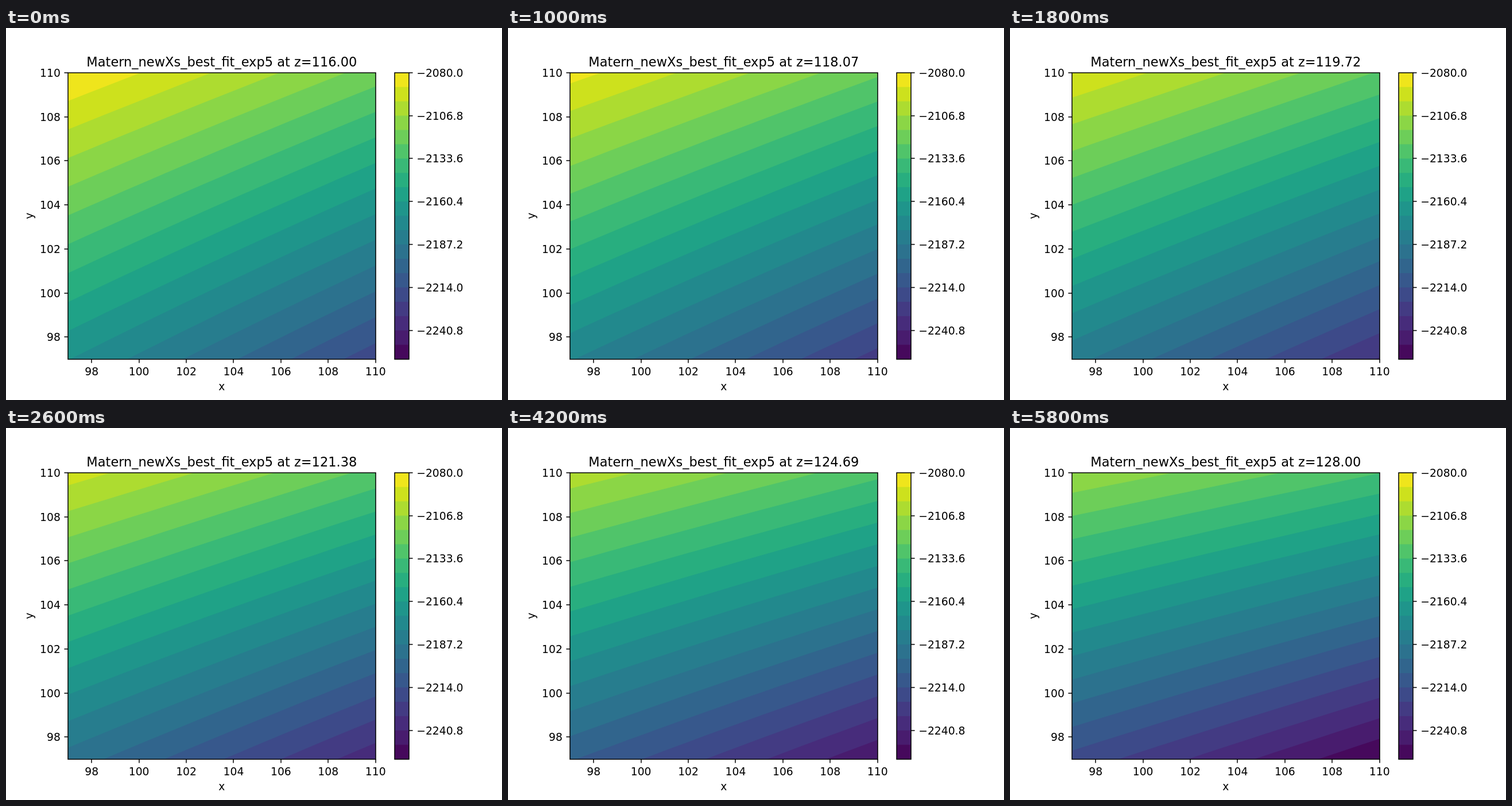
An HTML page that plays this animation: 864x648 px, repeating every 6000 ms.

```html
<!DOCTYPE html>
<html lang="en">
<head>
<meta charset="utf-8">
<title>Contour sweep</title>
<style>
  html, body { margin: 0; width: 100%; height: 100%; overflow: hidden; background: #fff; }
  svg { display: block; }
  text { font-family: "DejaVu Sans", sans-serif; font-size: 18.75px; fill: #000; }
  .title { font-size: 22.5px; }
  .line { fill: none; stroke: #000; stroke-width: 1.5; }
</style>
</head>
<body>
<svg id="stage" width="864" height="648" viewBox="0 0 864 648">
  <clipPath id="plot"><rect x="108" y="78" width="536" height="499"/></clipPath>
</svg>
<script>
const STEPS = 30, STEP_MS = 200, BANDS = 20;
const LEFT = 108, TOP = 77.76, WIDTH = 535.68, HEIGHT = 498.96;
const BAR_X = 677, BAR_W = 25;
const MIN = 97, SPAN = 13, Z0 = 116, Z_SPAN = 12;

// viridis, bright to dark
const COLORS = ("efe51c cde11d addc30 8bd646 6dce59 50c46a 39b977 28ae7f 1fa287 1f958b " +
  "22898d 277d8e 2c728e 31658d 37588c 3d4a89 433b83 472c7b 481c6e 46095c")
  .split(" ").map(c => "#" + c);

const stage = document.getElementById("stage");

function add(tag, attrs, parent = stage) {
  const el = document.createElementNS("http://www.w3.org/2000/svg", tag);
  for (const key in attrs) el.setAttribute(key, attrs[key]);
  parent.append(el);
  return el;
}

function label(str, x, y, anchor, extra = {}) {
  const el = add("text", { x, y, "text-anchor": anchor, ...extra });
  el.textContent = str;
  return el;
}

const line = d => add("path", { d, class: "line" });

const field = add("g", { "clip-path": "url(#plot)" });
const bands = COLORS.map(fill => add("path", { fill }, field));

// Axes
line("M108 78H644V577H108Z");
for (let v = 98; v <= 110; v += 2) {
  const part = (v - MIN) / SPAN;
  const x = LEFT + part * WIDTH, y = TOP + (1 - part) * HEIGHT;
  line(`M${Math.round(x)} 577v6.56M108 ${Math.round(y)}h-6.56`);
  label(v, x, 604.8, "middle");
  label(v, 94.9, y + 7, "end");
}
label("x", 375.84, 631, "middle");
label("y", 0, 0, "middle", { transform: "translate(47 327.2) rotate(-90)" });
const title = label("", 375.84, 66.7, "middle", { class: "title" });

// Colour bar
COLORS.forEach((fill, i) => {
  const y = TOP + i * HEIGHT / BANDS;
  add("rect", { x: BAR_X, y, width: BAR_W, height: 577 - y, fill });
});
line(`M${BAR_X} 78h${BAR_W}V577h-${BAR_W}Z`);
for (let i = 0; i < 7; i++) {
  const y = TOP + i * 3 * HEIGHT / BANDS;
  line(`M${BAR_X + BAR_W} ${Math.round(y)}h6.56`);
  label("\u2212" + (2080 + 26.8 * i).toFixed(1), 715.2, y + 7, "start");
}

// Height t where the field reaches a level: base + b*t + a*t*t = level
function crossing(level, s, w) {
  const q = w * (1 - w), s2 = s * s;
  const base = 3.124 * w + 0.43 * q + s * (4.14 - 1.58 * w + 0.28 * q) + s2 * (0.32 - 0.035 * w);
  const b = 10.1 + 2.318 * w - 0.23 * q + s * (1.15 + 0.34 * w) + s2 * (0.02 + 0.135 * w);
  const a = -0.14 - 0.048 * w + s * (0.03 + 0.12 * w);
  const rest = level - base;
  return 2 * rest / (b + Math.sqrt(b * b + 4 * a * rest));
}

function bandPath(level, w) {
  let d = "";
  for (let i = 0; i <= 16; i++) {
    const s = i / 16;
    const x = LEFT + s * 536;
    const y = TOP + HEIGHT * crossing(level, s, w);
    d += `${i ? "L" : "M"}${x.toFixed(2)} ${y.toFixed(2)}`;
  }
  return d + "V1200H108Z";
}

function draw(step) {
  const w = step / (STEPS - 1);
  title.textContent = `Matern_newXs_best_fit_exp5 at z=${(Z0 + Z_SPAN * w).toFixed(2)}`;
  bands.forEach((band, k) => band.setAttribute("d", k ? bandPath(k, w) : "M108 78H644V577H108Z"));
}

let shown = -1;
const start = performance.now();
function tick(now) {
  const step = Math.floor(Math.max(0, now - start) / STEP_MS) % STEPS;
  if (step !== shown) draw(shown = step);
  requestAnimationFrame(tick);
}
tick(start);
</script>
</body>
</html>
```
